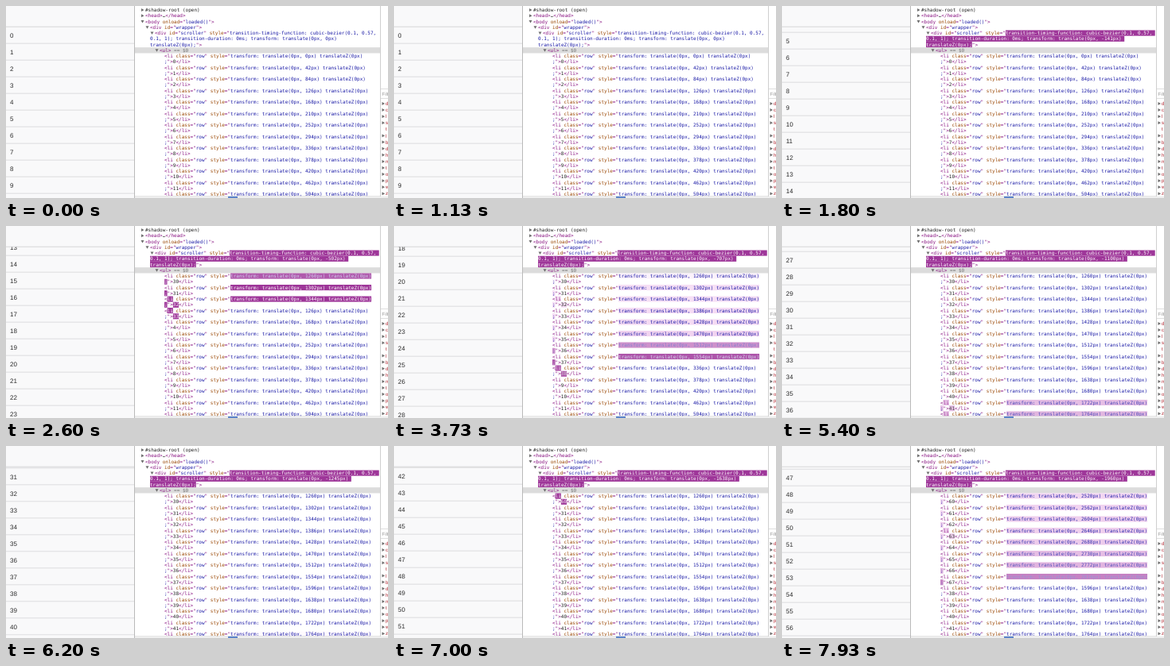
Animation, 480 px wide and 242 px high, one loop 8000 ms. Source, as an HTML page with a canvas:

```html
<!DOCTYPE html>
<html lang="en">
<head>
<meta charset="utf-8">
<title>Infinite scroll with recycled rows</title>
<style>
html, body { margin: 0; width: 100%; height: 100%; overflow: hidden; background: #fff; }
canvas { display: block; }
</style>
</head>
<body>
<canvas id="stage" width="480" height="242"></canvas>
<script>
const ctx = document.getElementById('stage').getContext('2d');
const LOOP = 8000, STEP = 200 / 3;
const CHAR = 3.612, LINE = 7.25, TOP = 5.1;
const POOL = 30, ROW = 42, VISIBLE = 13;
const PURPLE = [158, 54, 153], PINK = [245, 219, 244], WHITE = [255, 255, 255];
const TAG = [136, 18, 128], ATTR = [153, 69, 0], VALUE = [26, 26, 166], TEXT = [34, 34, 34];
const GRAY = [120, 120, 120];

// Scroll offset on the stage, and the lagging page offset in the inspector: [ms, px]
const listOffset = smoothTrack([[1480, 0], [1800, 98], [2100, 128], [2300, 137], [2600, 283],
  [2900, 304], [3250, 312], [3730, 387], [4000, 408], [4750, 416], [5100, 508], [5400, 561],
  [5700, 580], [6000, 593], [6350, 700], [6750, 775], [7000, 881], [7400, 952], [7930, 984], [8000, 986]]);
const shownOffset = smoothTrack([[1560, 0], [1800, 141], [2150, 250], [2400, 272], [2600, 502],
  [2750, 560], [3000, 604], [3350, 622], [3730, 707], [4000, 805], [4750, 828], [5150, 1000],
  [5400, 1100], [5700, 1150], [6050, 1180], [6400, 1370], [6750, 1510], [7000, 1638],
  [7200, 1770], [7450, 1894], [7700, 1938], [7930, 1960], [8000, 1963]]);

// Monotone cubic interpolation
function smoothTrack(points) {
  const last = points.length - 1;
  const rise = i => (points[i + 1][1] - points[i][1]) / (points[i + 1][0] - points[i][0]);
  const slope = points.map((_, i) => {
    if (i === 0 || i === last) return 0;
    const a = rise(i - 1), b = rise(i);
    return a * b > 0 ? 2 * a * b / (a + b) : 0;
  });
  return t => {
    if (t <= points[0][0]) return points[0][1];
    if (t >= points[last][0]) return points[last][1];
    const i = points.findIndex(p => p[0] > t) - 1;
    const [t0, v0] = points[i], [t1, v1] = points[i + 1];
    const h = t1 - t0, u = (t - t0) / h, w = 1 - u;
    return v0 * w * w * (1 + 2 * u) + v1 * u * u * (3 - 2 * u)
      + h * u * w * (slope[i] * w - slope[i + 1] * u);
  };
}

// How many rows have been moved below the others at a page offset
const movedRows = offset => Math.max(Math.floor((offset + 290) / ROW) - POOL / 2, 0);
const indexOf = (row, moved) => row + POOL * Math.max(Math.ceil((moved - row) / POOL), 0);

// Inspector state for each step, with the times of the latest changes
function buildHistory() {
  const history = [];
  let offset = 0, offsetAt = -Infinity;
  let rows = Array.from({ length: VISIBLE }, (_, i) =>
    ({ place: i, label: i, placeAt: -Infinity, labelAt: -Infinity }));
  for (let k = 0; k < LOOP / STEP; k++) {
    const t = Math.round(k * STEP / 10) * 10;
    const next = Math.round(shownOffset(t));
    if (next !== offset) { offset = next; offsetAt = t; }
    const moved = movedRows(offset);
    const filled = Math.min(moved + 1, movedRows(2 * listOffset(t)));
    rows = rows.map((old, i) => {
      const row = { ...old, place: indexOf(i, moved), label: indexOf(i, Math.max(moved, filled)) };
      if (row.label !== old.label) row.labelAt = t;
      if (row.place !== old.place) {
        row.placeAt = t;
        if (row.labelAt !== t) row.labelAt = -Infinity;
      }
      return row;
    });
    history.push({ t, offset, offsetAt, rows });
  }
  return history;
}

// cubic-bezier(0, 0, 0.2, 1)
function easeOut(x) {
  let lo = 0, hi = 1;
  for (let i = 0; i < 18; i++) {
    const s = (lo + hi) / 2;
    if (0.6 * s * s + 0.4 * s * s * s < x) lo = s; else hi = s;
  }
  return lo * lo * (3 - 2 * lo);
}

const rgb = (c, alpha = 1) => `rgba(${c.map(Math.round).join()},${alpha})`;
const mix = (a, b, p) => a.map((v, i) => v + (b[i] - v) * p);

function box(x, y, w, h, color) {
  ctx.fillStyle = color;
  ctx.fillRect(x, y, w, h);
}

function flash(age, color) {
  const x = age / 1400;
  if (x >= 1) return { ink: rgb(color) };
  if (x >= 0.8) return { ink: rgb(color), fill: rgb(PINK, 1 - easeOut((x - 0.8) / 0.2)) };
  const p = easeOut(x / 0.8);
  return { ink: rgb(mix(WHITE, color, p)), fill: rgb(mix(PURPLE, PINK, p)) };
}

// Each part is [text, color, age of its last change]
function codeLine(x, line, ...parts) {
  const y = TOP + line * LINE;
  for (const [text, color, age = Infinity] of parts) {
    const { ink, fill } = flash(age, color);
    const width = text.length * CHAR;
    if (fill) box(x, y - 3.6, width, 7.1, fill);
    ctx.fillStyle = ink;
    ctx.fillText(text, x, y + 2.1);
    x += width;
  }
}

function arrow(x, y, open) {
  ctx.fillStyle = '#6e6e6e';
  ctx.beginPath();
  if (open) { ctx.moveTo(x, y - 1.5); ctx.lineTo(x + 4, y - 1.5); ctx.lineTo(x + 2, y + 2); }
  else { ctx.moveTo(x + 0.5, y - 2); ctx.lineTo(x + 4, y); ctx.lineTo(x + 0.5, y + 2); }
  ctx.fill();
}

const attribute = (name, value) => [[' ' + name, ATTR], ['="', TAG], [value, VALUE], ['"', TAG]];

function drawList(offset) {
  box(0, 0, 161, 242, '#f9f9fa');
  ctx.save();
  ctx.beginPath();
  ctx.rect(0, 26, 161, 216);
  ctx.clip();
  ctx.font = '8px "Liberation Sans", Arial, sans-serif';
  const first = Math.floor(offset / 21);
  for (let n = first; n < first + 12; n++) {
    const y = 26.5 + n * 21 - offset;
    box(0, y + 20.2, 161, 0.9, '#dadadb');
    ctx.fillStyle = '#2b2b2b';
    ctx.fillText(n, 5, y + 13.4);
  }
  ctx.restore();
  box(0, 25.7, 161, 0.9, '#d2d2d3');
  box(161, 0, 1, 242, '#b9b9b9');
}

function drawInspector({ t, offset, offsetAt, rows }) {
  ctx.font = '6px "DejaVu Sans Mono", monospace';
  box(162, TOP + 7 * LINE - 3.7, 308, 7.3, '#dcdcdc');
  [[169.5, 0], [169.5, 1], [169.5, 2, true], [175.5, 3, true], [181.5, 4, true], [187.5, 7, true]]
    .forEach(([x, line, open]) => arrow(x, TOP + line * LINE, open));

  codeLine(175, 0, ['#shadow-root (open)', TEXT]);
  codeLine(175, 1, ['<head>', TAG], ['…', TEXT], ['</head>', TAG]);
  codeLine(175, 2, ['<body', TAG], ...attribute('onload', 'loaded()'), ['>', TAG]);
  codeLine(181, 3, ['<div', TAG], ...attribute('id', 'wrapper'), ['>', TAG]);

  const age = t - offsetAt;
  const y = offset ? -offset : 0;
  codeLine(187, 4, ['<div', TAG], ...attribute('id', 'scroller'), [' style', ATTR], ['="', TAG],
    ['transition-timing-function: cubic-bezier(0.1, 0.57, ', VALUE, age]);
  codeLine(181, 5, [`0.1, 1); transition-duration: 0ms; transform: translate(0px, ${y}px) `, VALUE, age]);
  codeLine(181, 6, ['translateZ(0px);', VALUE, age], ['">', TAG]);
  codeLine(193, 7, ['<ul>', TAG], [' == $0', GRAY]);

  rows.forEach((row, i) => {
    const moveAge = t - row.placeAt, labelAge = t - row.labelAt;
    codeLine(199, 8 + 2 * i, ['<', TAG], ['li', TAG, labelAge], ...attribute('class', 'row'),
      [' style', ATTR], ['="', TAG],
      [`transform: translate(0px, ${row.place * ROW}px) translateZ(0px)`, VALUE, moveAge]);
    codeLine(199, 9 + 2 * i, [';', VALUE, moveAge], ['">', TAG],
      [String(row.label), TEXT, labelAge], ['</li>', TAG]);
  });

  box(162, 239.8, 318, 3, '#f1f1f1');
  box(162, 239.6, 318, 0.6, '#cfcfcf');
  box(279, 240, 12, 2, '#5b84c9');
}

function drawSidebar() {
  box(470, 0, 10, 240, '#fff');
  box(470, 0, 0.8, 240, '#c4c4c4');
  box(471, 104, 9, 0.7, '#d0d0d0');
  box(471, 116, 9, 0.7, '#d0d0d0');
  ctx.save();
  ctx.beginPath();
  ctx.rect(471, 100, 9, 140);
  ctx.clip();
  ctx.font = '6px "Liberation Sans", Arial, sans-serif';
  ctx.fillStyle = '#999';
  ctx.fillText('Filter', 472.5, 113);
  [...'dclstlbdhmtopwz'].forEach((letter, i) => {
    const y = 123 + i * 8.1;
    if (i !== 4) arrow(472, y, false);
    ctx.fillStyle = '#b0202a';
    ctx.fillText(letter, 477, y + 2);
  });
  ctx.restore();
}

const history_ = buildHistory();

function draw(now) {
  const k = Math.floor((now % LOOP + 5) / STEP) % history_.length;
  const state = history_[k];
  ctx.textRendering = 'geometricPrecision';
  box(0, 0, 480, 242, '#fff');
  drawInspector(state);
  drawSidebar();
  drawList(listOffset(state.t));
}

const start = performance.now();
function tick() {
  draw(performance.now() - start);
  requestAnimationFrame(tick);
}
tick();
</script>
</body>
</html>
```
